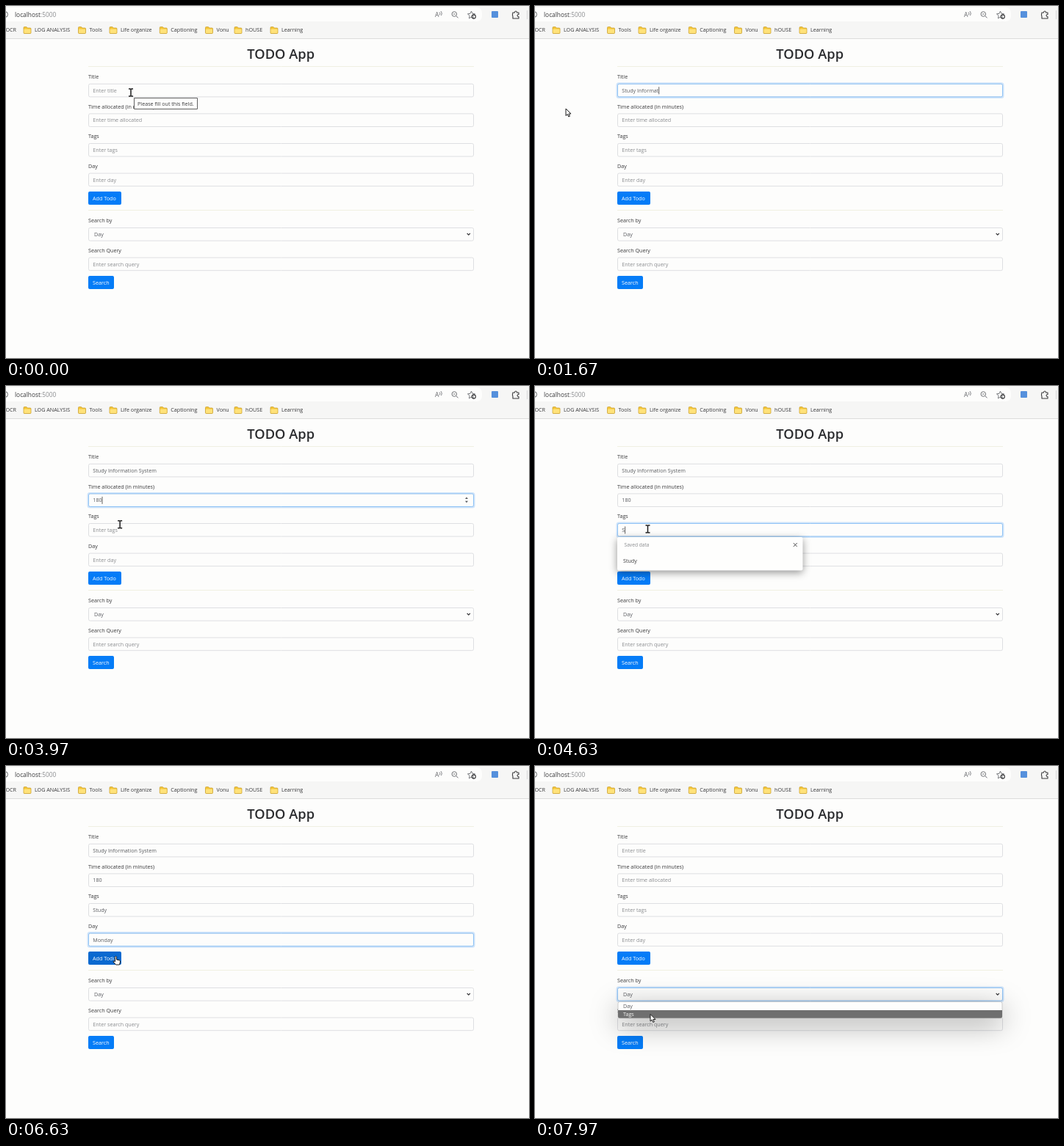
Animation of 712 by 480 pixels, one loop 8 s. Source, as an HTML page with a canvas:

```html
<!DOCTYPE html>
<html lang="en">
<head>
<meta charset="utf-8">
<title>TODO App</title>
<style>
  html, body { margin: 0; width: 100%; height: 100%; overflow: hidden; background: #fdfdfc; }
  canvas { display: block; width: 712px; height: 480px; }
</style>
</head>
<body>
<canvas id="stage"></canvas>
<script>
const LOOP = 8000, LEFT = 112, WIDTH = 525, FIELD_H = 18.6;
const INK = '#3a3a3c', VALUE = '#5a5c60', MUTED = '#8a8c8f', BORDER = '#dedfe2', PAGE = '#fdfdfc';

const canvas = document.getElementById('stage');
const ctx = canvas.getContext('2d');
const dpr = window.devicePixelRatio || 1;
canvas.width = 712 * dpr;
canvas.height = 480 * dpr;

// keys: [time, typed characters]; focus and list: [from, to]
const fields = [
  { y: 105.8, label: 'Title', hint: 'Enter title', value: 'Study Information System',
    keys: [[770, 1], [1570, 14], [1690, 14], [2330, 20], [2460, 20], [2530, 24]], focus: [250, 2960] },
  { y: 146.4, label: 'Time allocated (in minutes)', hint: 'Enter time allocated', value: '180',
    keys: [[3270, 1], [3650, 3]], focus: [2960, 4110], list: [3060, 3270],
    items: ['a', 'd', 'b', 'c', 'e', '7am'], spinner: true },
  { y: 187, label: 'Tags', hint: 'Enter tags', value: 'Study',
    keys: [[4600, 1], [4860, 5]], focus: [4110, 5420], list: [4170, 4940],
    items: ['Study', 'a', 'b', 'c', 'd', 'e'] },
  { y: 227.6, label: 'Day', hint: 'Enter day', value: 'Monday',
    keys: [[5970, 1], [6230, 6]], focus: [5420, 6850], list: [5500, 6270],
    items: ['Monday', 'a', 'b', 'c', 'd', 'e'] },
  { y: 302, label: 'Search by', select: true, focus: [7620, 9000] },
  { y: 342.6, label: 'Search Query', hint: 'Enter search query' }
];
const buttons = [
  { label: 'Add Todo', y: 253, w: 45 },
  { label: 'Search', y: 368, w: 35 }
];
const bookmarks = [['LOG ANALYSIS', 39], ['Tools', 113.5], ['Life organize', 156], ['Captioning', 224.3],
  ['Vonu', 286.5], ['hOUSE', 326], ['Learning', 375]];
const mousePath = [[0, 170, 118], [350, 171, 117], [900, 42, 140], [2600, 42, 140], [2950, 162, 163],
  [3720, 162, 163], [4070, 153.5, 195], [4930, 153.5, 195], [5400, 150.5, 231.5], [5800, 150.5, 231.5],
  [5830, 151, 247], [6290, 151, 247], [6590, 149.5, 260], [6900, 149.5, 260], [7540, 157, 312],
  [7760, 157, 312], [7940, 157, 338.5]];
const CLEARED = 6850, MENU_OPEN = 7670;

const clamp = v => Math.max(0, Math.min(1, v));
const within = (t, span) => span && t >= span[0] && t < span[1];

function segment(keys, t) {
  let i = 0;
  while (i < keys.length - 1 && t >= keys[i + 1][0]) i++;
  const a = keys[i], b = keys[i + 1] || a;
  return [a, b, b === a ? 0 : clamp((t - a[0]) / (b[0] - a[0]))];
}
function mouseAt(t) {
  const [a, b, u] = segment(mousePath, t), e = u * u * (3 - 2 * u);
  return { x: a[1] + (b[1] - a[1]) * e, y: a[2] + (b[2] - a[2]) * e };
}
function typed(field, t) {
  if (!field.keys || t < field.keys[0][0] || t >= CLEARED) return '';
  const [a, b, u] = segment(field.keys, t);
  return field.value.slice(0, Math.floor(a[1] + (b[1] - a[1]) * u + 1e-6));
}

function text(s, x, y, color = INK, size = 7.18, weight = 400) {
  ctx.font = `${weight} ${size}px "Open Sans", "Noto Sans", sans-serif`;
  ctx.fillStyle = color;
  ctx.fillText(s, x, y);
}
function box(x, y, w, h, r, fill, stroke, lineWidth = 1) {
  ctx.beginPath();
  ctx.roundRect(x, y, w, h, r);
  if (fill) { ctx.fillStyle = fill; ctx.fill(); }
  if (stroke) { ctx.strokeStyle = stroke; ctx.lineWidth = lineWidth; ctx.stroke(); }
}
function line(points, color, width = 1) {
  ctx.beginPath();
  points.forEach(([x, y]) => ctx.lineTo(x, y));
  ctx.strokeStyle = color;
  ctx.lineWidth = width;
  ctx.stroke();
}
function circle(x, y, r, color = '#606266', width = 1) {
  ctx.beginPath();
  ctx.arc(x, y, r, 0, 7);
  ctx.strokeStyle = color;
  ctx.lineWidth = width;
  ctx.stroke();
}
function shape(path, x, y, fill, stroke, width = 1) {
  const p = new Path2D(path);
  ctx.save();
  ctx.translate(x, y);
  ctx.lineJoin = 'round';
  if (fill) { ctx.fillStyle = fill; ctx.fill(p); }
  if (stroke) { ctx.strokeStyle = stroke; ctx.lineWidth = width; ctx.stroke(p); }
  ctx.restore();
}
function raisedBox(x, y, w, h, r, fill, blur, dy, shadow) {
  ctx.save();
  ctx.shadowColor = shadow;
  ctx.shadowBlur = blur * dpr;
  ctx.shadowOffsetY = dy * dpr;
  box(x, y, w, h, r, fill);
  ctx.restore();
}

function drawBrowser() {
  box(0, 0, 712, 44, 0, '#f6f6f5');
  box(-10, 2, 658, 19, 7, '#fdfdfc');
  line([[0, 44.5], [712, 44.5]], '#dcdcdc');
  circle(-1.5, 11.5, 4);
  text('localhost', 12, 14.9, INK, 8.35);
  const w = ctx.measureText('localhost').width;
  text(':5000', 12 + w, 14.9, MUTED, 8.35);

  const icon = '#66686c';
  text('A', 584, 15, icon, 8.5);
  shape('M0 0Q2 2 0 4M2 -1.5Q4.5 1.5 2.5 4.5', 590, 8.5, null, icon, .8);
  circle(610.3, 11, 3.3, icon, .9);
  line([[612.8, 13.5], [615.5, 16.3]], icon);
  line([[608.8, 11], [611.8, 11]], icon, .8);
  shape('M0-5L1.5-1.7 5-1.2 2.4 1.3 3 4.8 0 3.1-3 4.8-2.4 1.3-5-1.2-1.5-1.7Z', 633.5, 12, null, icon, .9);
  circle(636.8, 14.5, 2.6, INK, 1.1);
  box(661, 7, 9, 9, 1, '#5590dc');
  shape('M-4-3H-1.5Q-1.5-5 0-5T1.5-3H4V-.5Q2-.5 2 1T4 2.5V5H-4V2.5Q-5-.0-4-3Z', 694, 12, null, INK, 1.1);
  line([[709.5, 6], [709.5, 18]], '#d8d8d8');

  text('OCR', -.6, 35.2);
  for (const [name, x] of bookmarks) {
    shape('M0 1Q0 0 1 0H4L5.5 1.5H9Q10 1.5 10 2.5V8Q10 9 9 9H1Q0 9 0 8Z', x - 15, 28.5, '#f5c73a', '#c59a26', .7);
    box(x - 14.5, 31.5, 9, 5.5, .7, '#ffe27a');
    text(name, x, 35.2);
  }
}

function drawField(field, t) {
  const { y } = field;
  text(field.label, LEFT, y - 6.6);
  const ring = field.focus ? clamp((t - field.focus[0]) / 150) * (1 - clamp((t - field.focus[1]) / 150)) : 0;
  box(LEFT + .5, y + .5, WIDTH - 1, FIELD_H - 1, 2, PAGE, BORDER);
  if (ring) {
    ctx.globalAlpha = ring;
    box(LEFT - .5, y - .5, WIDTH + 1, FIELD_H + 1, 2.5, null, '#cfe4fa', 2);
    box(LEFT + .5, y + .5, WIDTH - 1, FIELD_H - 1, 2, null, '#8fc3f5');
    ctx.globalAlpha = 1;
  }
  if (field.select) {
    text('Day', 120, y + 12, VALUE);
    line([[627.7, y + 8], [629.8, y + 10.2], [631.9, y + 8]], INK, 1.1);
    return;
  }
  const value = typed(field, t);
  text(value || field.hint, 118.3, y + 12, value ? VALUE : MUTED);
  if (within(t, field.focus)) {
    const x = 118.7 + (value ? ctx.measureText(value).width : 0);
    if (t < 6300) line([[x, y + 4.5], [x, y + 14.5]], INK, .8);
    if (field.spinner) {
      shape('M-2 -1.3L0 -3.8 2 -1.3ZM-2 1.3L0 3.8 2 1.3Z', 627, y + 9, VALUE);
    }
  }
}

function drawSavedData(field, t) {
  if (!within(t, field.list)) return;
  const prefix = typed(field, t);
  const items = field.items.filter(item => item.startsWith(prefix));
  const top = field.y + FIELD_H + .3;
  raisedBox(LEFT, top, 252.5, 24.2 + items.length * 21.4, 2, '#fefefd', 11, 3, 'rgba(0,0,0,.42)');
  text('Saved data', 121.5, top + 12.8, MUTED, 6.65);
  line([[351.8, top + 8.2], [356.8, top + 13.2]], INK, .9);
  line([[356.8, top + 8.2], [351.8, top + 13.2]], INK, .9);
  items.forEach((item, i) => text(item, 120, top + 34.6 + i * 21.4));
}

function drawMenu(mouse) {
  raisedBox(LEFT + 1, 321.5, WIDTH - 2, 22.3, 2.5, '#fdfdfc', 38, 9, 'rgba(0,0,0,.38)');
  box(LEFT + 1, 321.5, WIDTH - 2, 22.3, 2.5, null, '#b4b4b4', .6);
  ['Day', 'Tags'].forEach((name, i) => {
    const active = (mouse.y > 333) === (i === 1);
    if (active) box(LEFT + 1, 322 + i * 11, WIDTH - 2, 10.8, i ? [0, 0, 2.5, 2.5] : 0, '#6f6f6f');
    text(name, 120, 330.4 + i * 10.8, active ? '#f6f6f4' : VALUE);
  });
}

const overButton = (b, m) => m.x > LEFT && m.x < LEFT + b.w && m.y > b.y && m.y < b.y + 18;

function drawMouse({ x, y }) {
  const overField = x > LEFT && x < LEFT + WIDTH &&
    fields.some(f => !f.select && y > f.y && y < f.y + FIELD_H);
  if (overField) {
    shape('M-3-5H-.8L0-4.4 .8-5H3M0-4.5V4.5M-3 5H-.8L0 4.4 .8 5H3', x, y, null, '#1c1c1c', 1.5);
  } else if (buttons.some(b => overButton(b, { x, y }))) {
    shape('M-1 0Q0-1.2 1 0V4L5 5Q6.3 5.5 6 7L5 11H0L-3.4 7Q-3.6 5.6-2 6L-1 7Z', x, y, PAGE, '#1c1c1c');
  } else {
    shape('M0 0V9.6L2.2 7.6 3.8 11 5.4 10.3 3.9 7H7Z', x, y, PAGE, '#1c1c1c');
  }
}

function draw(t) {
  const mouse = mouseAt(t);
  ctx.setTransform(dpr, 0, 0, dpr, 0, 0);
  box(0, 0, 712, 480, 0, PAGE);
  drawBrowser();
  ctx.textAlign = 'center';
  text('TODO App', 374.2, 71.7, '#2a2b2e', 18.3, 600);
  ctx.textAlign = 'left';
  for (const y of [82.5, 278.5]) line([[LEFT, y], [LEFT + WIDTH, y]], '#f0f0e2');

  fields.forEach(field => drawField(field, t));
  for (const b of buttons) {
    box(LEFT, b.y, b.w, 18, 2, overButton(b, mouse) ? '#0a69d0' : '#057cf7');
    text(b.label, LEFT + 6, b.y + 11.8, '#fdfdfd');
  }
  fields.forEach(field => drawSavedData(field, t));
  if (t >= MENU_OPEN) drawMenu(mouse);
  if (t < 100) {
    box(174.5, 125.5, 86, 15, 0, '#fefefd', '#606060');
    text('Please fill out this field.', 179, 135.7);
  }
  drawMouse(mouse);
}

const start = performance.now();
function tick() {
  draw((performance.now() - start) % LOOP);
  requestAnimationFrame(tick);
}
tick();
</script>
</body>
</html>
```
